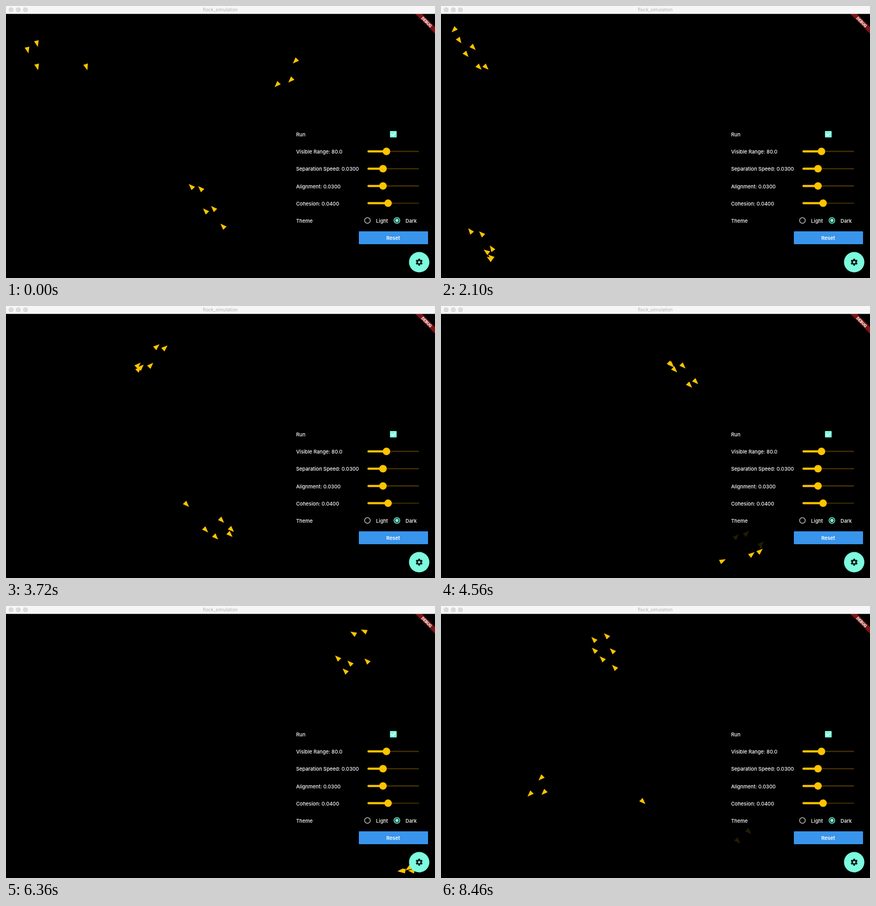
An HTML page for the animation above (8.52 s loop, 800 by 507 pixels).

```html
<!DOCTYPE html>
<html lang="en">
<head>
<meta charset="utf-8">
<title>flock_simulation</title>
<style>
  html, body { margin: 0; width: 100%; height: 100%; overflow: hidden; background: #000; }
  svg { display: block; width: 800px; height: 507px; }
  text { font: 500 9.35px Inter, Roboto, sans-serif; fill: #fff; }
  .title { font: 400 8.6px Inter, Roboto, sans-serif; fill: #b2b2b2; }
  .debug { font: 900 7.6px Roboto, sans-serif; }
  .reset { font-weight: 600; }
  .mid { text-anchor: middle; }
  .line { fill: none; stroke-linecap: round; }
</style>
</head>
<body>
<svg id="stage" viewBox="0 0 800 507">
  <rect width="800" height="507"/>
  <g id="birds" fill="#ffc400" transform="translate(.5 .5)"></g>

  <rect x="536" y="223" width="256" height="226" fill="#000" opacity=".86"/>
  <g id="panel">
    <text x="541" y="243">Run</text>
    <rect x="716" y="233" width="12.5" height="12" rx="1" fill="#7dfbde"/>
    <path class="line" d="M718.6 239.2l2.6 2.6 5-5" stroke="#fff" stroke-width="1.3"/>
    <text x="541" y="404">Theme</text>
    <circle class="line" cx="674" cy="399.7" r="5.3" stroke="#b5b5b5" stroke-width="1.5"/>
    <text x="690" y="404">Light</text>
    <circle class="line" cx="729" cy="399.7" r="5.3" stroke="#7dfbde" stroke-width="1.5"/>
    <circle cx="729" cy="399.7" r="3.1" fill="#7dfbde"/>
    <text x="745" y="404">Dark</text>
    <rect x="658" y="420" width="129" height="24" rx="1" fill="#3994ec"/>
    <text class="reset mid" x="722" y="436">Reset</text>
  </g>

  <g transform="translate(770.5 477.5)">
    <circle r="19" fill="#7dfbde"/>
    <g id="gear" stroke="#0a1512" fill="none">
      <circle r="3.6" stroke-width="2.6"/>
    </g>
  </g>

  <g transform="translate(800 14.5) rotate(45)">
    <rect x="-40" y="17.4" width="80" height="8.8" fill="#7d1515"/>
    <text class="debug mid" y="24.6">DEBUG</text>
  </g>

  <rect width="800" height="14.5" fill="#f6f6f6"/>
  <rect y="14" width="800" height=".6" fill="#d4d4d4"/>
  <g fill="#dcdcdc" stroke="#c9c9c9" stroke-width=".7">
    <circle cx="9.5" cy="7" r="4"/><circle cx="23" cy="7" r="4"/><circle cx="36.3" cy="7" r="4"/>
  </g>
  <text class="title mid" x="399.5" y="10.3">flock_simulation</text>
</svg>
<script>
const STEP = 60, STEPS = 142;
const SPEED = 13;            // pixels per step along each axis
const ROUND = 65;            // distance from a wall at which a bird starts to turn
const FROM = 23, TO = 123;   // steps at which each bird's two key points are given

// Birds fly diagonally and turn back at each wall in order.
// Each bird is [x, y] at FROM and [x, y] at TO; late joiners glide in from a start point.
const upper = { x: [-10, 800], y: [8, 515, 8] };
const lower = { x: [2, 797], y: [508, 20, 526] };
const groups = [
  { walls: upper, birds: [[47, 38, 421, 85], [64.5, 42, 400.5, 115], [73.5, 83.5, 426.5, 112]] },
  { walls: { ...upper, x: [...upper.x, 385] }, birds: [[88.5, 79, 431.5, 185], [106, 112, 452, 202.5]] },
  {
    walls: { ...upper, x: [...upper.x, 293] }, birds: [[169, 143, 445, 129]],
    glide: { until: FROM, x: { start: [149], speed: 4 }, y: { start: [111.5], speed: SPEED } },
  },
  { walls: lower, birds: [[241, 400, 535, 333], [232.5, 435.5, 519.5, 297], [207, 444, 520.5, 317]] },
  {
    walls: lower, birds: [[265, 367, 543, 290], [265, 379, 554, 318], [265, 410.5, 558, 349]],
    glide: { until: 39, x: { start: [57, 39.5, 57.5], speed: 3 } },
  },
];

const stage = document.getElementById('stage');
function add(parent, name, attrs, text) {
  const el = document.createElementNS(stage.namespaceURI, name);
  for (const key in attrs) el.setAttribute(key, attrs[key]);
  if (text) el.textContent = text;
  parent.append(el);
  return el;
}

const panel = document.getElementById('panel');
[
  ['Visible Range: 80.0', 709.5],
  ['Separation Speed: 0.0300', 703],
  ['Alignment: 0.0300', 703],
  ['Cohesion: 0.0400', 712.5],
].forEach(([label, knob], i) => {
  const y = 271 + i * 32.2;
  add(panel, 'text', { x: 541, y: y + 4.2 }, label);
  add(panel, 'path', {
    d: `M${knob} ${y}H770`, stroke: '#402d00', 'stroke-width': 2.6,
    'stroke-dasharray': i === 3 ? '2.2 .7' : 'none',
  });
  add(panel, 'path', { class: 'line', d: `M676 ${y}H${knob}`, stroke: '#ffc400', 'stroke-width': 4 });
  add(panel, 'circle', { cx: knob, cy: y, r: 7, fill: '#ffc400' });
});

const gear = document.getElementById('gear');
for (let a = 0; a < 360; a += 60) {
  add(gear, 'path', { d: 'M0-3.5V-6.5', 'stroke-width': 3.2, transform: `rotate(${a})` });
}

// Position and direction after flying a distance between walls, with rounded turns.
function bounce(walls, from, dist) {
  let dir = Math.sign(walls[0] - from), pos = from + dir * dist, vel = dir;
  let at = 0, last = from;
  for (const wall of walls) {
    at += Math.abs(wall - last);
    const past = dist - at;
    const u = Math.min(1, Math.max(0, (past + ROUND) / (2 * ROUND)));
    pos -= 2 * dir * (u < 1 ? ROUND * u * u : past);
    vel -= 2 * dir * u;
    dir = -dir;
    last = wall;
  }
  return [pos, vel * SPEED];
}

// Motion along one axis: full speed outside the key points, evenly paced between them.
function axis(walls, turns, from, to) {
  const stops = [from, ...walls.slice(0, turns), to];
  const length = stops.slice(1).reduce((sum, p, i) => sum + Math.abs(p - stops[i]), 0);
  return step => bounce(walls, from,
    step < FROM ? SPEED * (step - FROM) :
    step > TO ? length + SPEED * (step - TO) :
    length * (step - FROM) / (TO - FROM));
}

// A cubic run-in from a start point that meets the given path smoothly.
function runIn(path, start, v0, until) {
  const [end, v1] = path(until), mean = (end - start) / until;
  return step => {
    if (step >= until) return path(step);
    const s = step / until, s2 = s * s, s3 = s2 * s;
    return [
      start + until * (mean * (3 * s2 - 2 * s3) + v0 * (s - 2 * s2 + s3) + v1 * (s3 - s2)),
      6 * mean * (s - s2) + v0 * (1 - 4 * s + 3 * s2) + v1 * (3 * s2 - 2 * s),
    ];
  };
}

const layer = document.getElementById('birds');
const birds = groups.flatMap(({ walls, birds, glide }) => birds.map(([x0, y0, x1, y1], i) => {
  const join = (path, run) => run ? runIn(path, run.start[i], run.speed, glide.until) : path;
  return {
    x: join(axis(walls.x, 2, x0, x1), glide?.x),
    y: join(axis(walls.y, 3, y0, y1), glide?.y),
    el: add(layer, 'path', { d: 'M8 0L-3.8 4.5V-4.5z' }),
  };
}));

function draw(step) {
  for (const bird of birds) {
    const [x, vx] = bird.x(step), [y, vy] = bird.y(step);
    const angle = Math.atan2(vy, vx) * 180 / Math.PI;
    bird.el.setAttribute('transform', `translate(${x.toFixed(2)} ${y.toFixed(2)}) rotate(${angle.toFixed(1)})`);
  }
}

const start = performance.now();
function tick() {
  draw(Math.floor((performance.now() - start) / STEP) % STEPS);
  requestAnimationFrame(tick);
}
tick();
</script>
</body>
</html>
```
